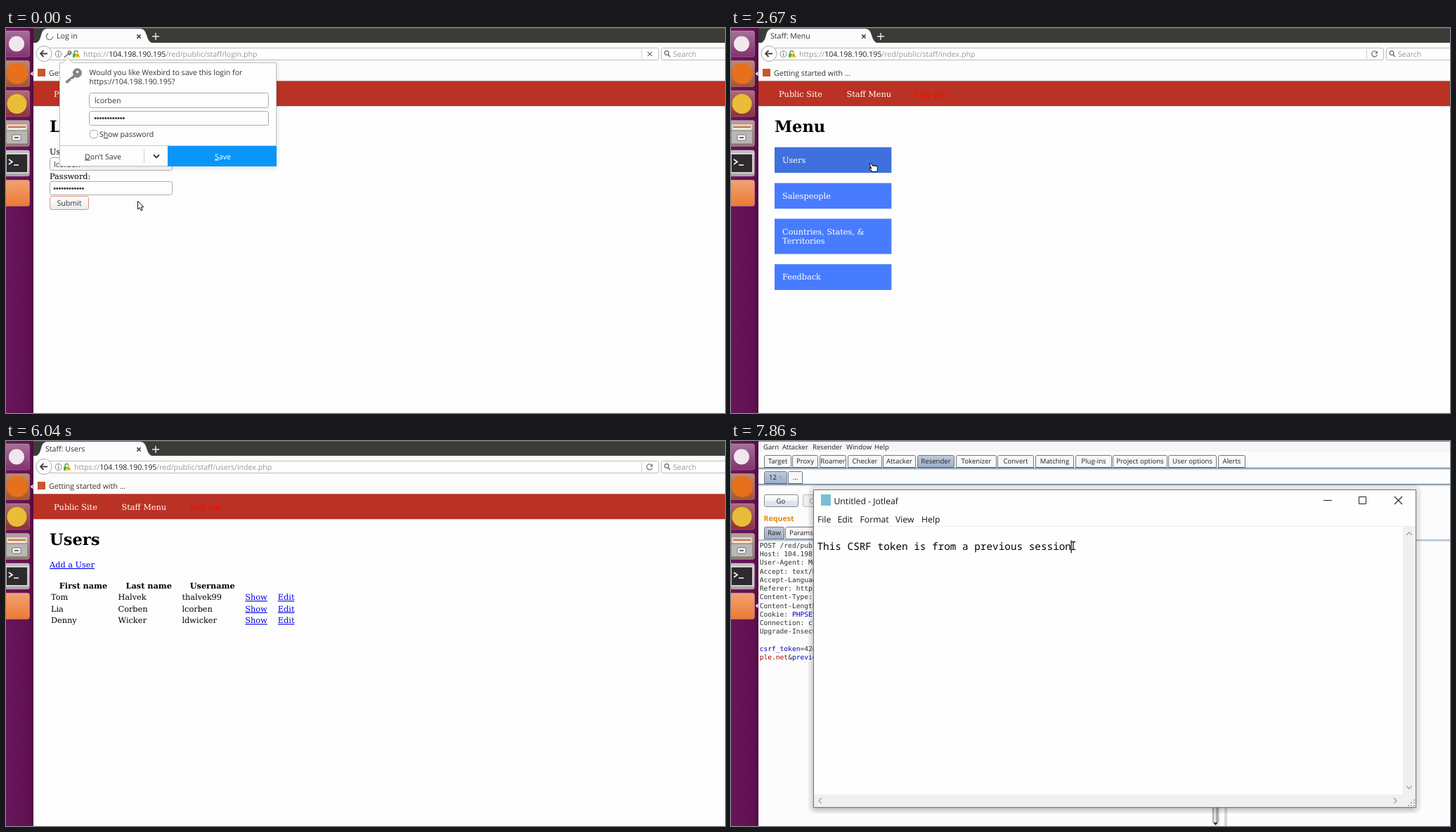
An HTML page that plays this animation: 1023x548 px, repeating every 8000 ms.

```html
<!DOCTYPE html>
<html lang="en">
<head>
<meta charset="utf-8">
<title>Login walkthrough</title>
<style>
html, body { margin: 0; width: 100%; height: 100%; overflow: hidden; background: #fdfdfd; }
svg { display: block; width: 1023px; height: 548px; }
text { text-rendering: geometricPrecision; white-space: pre; fill: #333; }
.ui { font: 10.6px "Open Sans", "Noto Sans", sans-serif; }
.page { font: 11.3px "DejaVu Serif", "Noto Serif", serif; fill: #000; }
.head { font: bold 22.6px "DejaVu Serif", "Noto Serif", serif; fill: #000; }
.tool { font: 9.6px "Open Sans", "Noto Sans", sans-serif; fill: #222; }
.raw { font: 9.6px "DejaVu Sans Mono", monospace; }
.win { font: 12.2px "Open Sans", "Noto Sans", sans-serif; fill: #111; }
.note { font: 14.35px "Noto Sans Mono", "DejaVu Sans Mono", monospace; fill: #000; }
.mid { text-anchor: middle; }
.white { fill: #fff; }
.blue { fill: #0000c8; }
.dim { fill: #999; }
.link { fill: #00e; text-decoration: underline; }
.bold { font-weight: bold; }
</style>
</head>
<body>
<svg id="stage" viewBox="0 0 1023 548"></svg>
<script>
const LOOP = 8000;
const LOADED_MENU = 1130, CLICK_USERS = 3140, LOADED_USERS = 3870, TOOL_OPEN = 6580;

const text = (cls, x, y, str) => `<text class="${cls}" x="${x}" y="${y}">${str}</text>`;
const rect = (x, y, w, h, fill, extra = '') =>
  `<rect x="${x}" y="${y}" width="${w}" height="${h}" fill="${fill}" ${extra}/>`;
const frame = (x, y, w, h, r = 2.5, fill = '#fdfdfd', stroke = '#aaa') =>
  rect(x + .5, y + .5, w - 1, h - 1, fill, `rx="${r}" stroke="${stroke}"`);
const line = (d, stroke = '#555', width = 1, extra = '') =>
  `<path d="${d}" fill="none" stroke="${stroke}" stroke-width="${width}" ${extra}/>`;
const shape = (d, fill, extra = '') => `<path d="${d}" fill="${fill}" ${extra}/>`;
const circle = (x, y, r, fill, extra = '') => `<circle cx="${x}" cy="${y}" r="${r}" fill="${fill}" ${extra}/>`;
const at = (x, y, body) => `<g transform="translate(${x} ${y})">${body}</g>`;
const cross = (x, y, r, color, width = 1.2) =>
  line(`M${x - r} ${y - r}l${2 * r} ${2 * r}m0 ${-2 * r}l${-2 * r} ${2 * r}`, color, width);
const under = (letter) => `<tspan text-decoration="underline">${letter}</tspan>`;

const defs = `<defs>
  <linearGradient id="side"><stop stop-color="#68165b"/><stop offset=".85" stop-color="#611051"/><stop offset="1" stop-color="#4d0a41"/></linearGradient>
  <linearGradient id="gloss" x2="0" y2="1"><stop stop-color="#fff" stop-opacity=".3"/><stop offset="1" stop-color="#fff" stop-opacity="0"/></linearGradient>
  <linearGradient id="button" x2="0" y2="1"><stop stop-color="#fff"/><stop offset="1" stop-color="#ebebeb"/></linearGradient>
  <linearGradient id="tab" x2="0" y2="1"><stop stop-color="#bfcbdb"/><stop offset="1" stop-color="#9dafc5"/></linearGradient>
  <filter id="soft"><feGaussianBlur stdDeviation="3"/></filter></defs>`;

function launcher(activeY) {
  const tiles = ['#82336f', '#a4572f', '#8d2f3b', '#94796f', '#a9a4a5', '#ec7a35'];
  const body = tiles.map((color, i) => {
    const y = 4 + i * 42.5;
    return rect(-3, y, 36.5, 37, color, 'rx="3" stroke="#d5a7c4" stroke-opacity=".35"') +
      rect(-3, y, 36.5, 37, 'url(#gloss)', 'rx="3"');
  }).join('');
  const cabinet = rect(1, 137, 29, 10, '#d9d4cd', 'rx="1"') + rect(3, 140, 25, 5, '#d06a42') +
    rect(3, 142, 25, 4, '#f1e6d4') + rect(0, 146, 31, 19, '#b9b7b3', 'rx="1" stroke="#77716d"') +
    rect(9, 152, 12, 8, '#f5f5f5', 'rx="1" stroke="#777"') + rect(12, 155, 6, 2, '#666');
  const terminal = rect(0, 179, 31, 27, '#2d2b2d', 'stroke="#eee" stroke-width="1.5"') +
    line('M4 187l5 3.5l-5 3.5M11 195h7', '#fff', 1.6);
  return rect(0, 0, 39, 548, 'url(#side)') + body + circle(15, 22.5, 11, '#f2e7ee') +
    circle(16, 65, 15, '#e6701c') + circle(15.5, 108, 14, '#e9bd37') + cabinet + terminal +
    shape(`M38.5 ${activeY - 3.5}l-4 3.5l4 3.5z`, '#e9dce6');
}

function spinner(t, connecting) {
  const turn = Math.floor(t / 143) * (connecting ? -50 : 65);
  const spin = `transform="rotate(${turn} 62 12)"`;
  return connecting
    ? circle(62, 12, 4.6, 'none', `stroke="#777" stroke-width="1.3" stroke-dasharray="19 9.9" ${spin}`)
    : circle(62, 12, 4.8, 'none', 'stroke="#b9dcf5" stroke-width="2.2"') +
      circle(62, 12, 4.8, 'none', `stroke="#2b93df" stroke-width="2.2" stroke-dasharray="17 14" ${spin}`);
}

const keyIcon = (x, y, scale, color) =>
  `<g transform="translate(${x} ${y}) scale(${scale})">` +
  shape('M21 1a7 7 0 0 0-9 10L0 20v3h5v-3h3v-3h3l3-3a7 7 0 0 0 7-13M18 4a2 2 0 1 1 0 4a2 2 0 1 1 0-4', color, 'fill-rule="evenodd"') + '</g>';

function browserChrome(t, state) {
  const { loading, connecting, popup, title, file } = state;
  const lockX = popup ? 95 : 82;
  const lock = line(`M${lockX + 2} 37v-2a2.5 2.5 0 0 1 5 0v2`, '#57a63c', 1.4) +
    rect(lockX, 36.5, 8.5, 5.5, '#55aa35', 'rx="1"') +
    shape(`M${lockX + 7} 34.5l4.5 7.5h-9z`, '#f6c321', 'stroke="#fdfdfd" stroke-width=".5"') +
    rect(lockX + 6.5, 37.5, 1, 2.5, '#755');
  const url = `https://<tspan fill="#222">104.198.190.195</tspan>/red/public/staff/${file}`;
  const action = loading ? cross(916, 37, 3.2, '#666') :
    line('M918.6 34.2a4 4 0 1 0 .8 4', '#777', 1.3) + shape('M920 32.5v4h-4z', '#777');
  return rect(39, 0, 984, 22, '#3c3b37') + rect(39, 0, 984, 1, '#55534e') +
    rect(39, 21, 984, 54, '#fcfcfc') +
    shape('M39 22C47 21 48 17 50 10C52 3 54 1 60 1H190C196 1 198 4 200 10C202 17 204 21 211 22Z', '#fcfcfc') +
    (loading ? spinner(t, connecting) : '') + text('ui', loading ? 72 : 56, 15.3, title) +
    cross(189, 12, 2.6, '#444', 1.5) + line('M208 12h10M213 7v10', '#eee', 1.4) +
    frame(60, 28, 869, 18, 2, '#fefefe', '#bbb') +
    circle(54, 36.5, 11, '#fcfcfc', 'stroke="#aaa"') +
    line('M59 36.5H49.5M53.5 32l-4.5 4.5l4.5 4.5', '#444', 1.8) +
    circle(74.5, 37, 4.5, 'none', 'stroke="#888"') + line('M74.5 36v3.8M74.5 33.8v1.3', '#777', 1.2) +
    (popup ? keyIcon(82.5, 32, .44, '#808080') : '') + lock +
    text('ui dim', popup ? 110 : 97, 41, url) +
    line('M904.5 30v14', '#ccc') + action + frame(932, 28, 95, 18, 2, '#fefefe', '#bbb') +
    circle(940, 35.5, 2.9, 'none', 'stroke="#666" stroke-width="1.2"') + line('M942 38l3 3', '#666', 1.4) +
    text('ui dim', 949, 41, 'Search') +
    rect(45, 58, 11, 11, '#c8562f') + text('ui', 61, 67.5, 'Getting started with …') +
    rect(39, 75, 984, 36, '#ba3224') + line('M39 75.5H1023M39 111.5H1023', '#bbb', 1, 'opacity=".55"') +
    text('page white', 68, 98, 'Public Site');
}

const dots = (x, y) => Array.from({ length: 12 }, (_, i) => circle(x + 1.6 + i * 3.66, y, 1.45, '#333')).join('');

const loginPage = () => text('head', 62, 148, 'Log in') +
  text('page', 62, 180, 'Username:') + frame(62, 184, 175, 19, 3) + text('ui', 68, 197.5, 'lcorben') +
  text('page', 62, 214.5, 'Password:') + frame(62, 218, 175, 20, 3) + dots(67.5, 228.5) +
  frame(62, 239, 56, 20, 3, 'url(#button)', '#e58f70') + text('ui mid', 90, 252.7, 'Submit');

const savePrompt = () => rect(77, 50, 309, 149, '#000', 'opacity=".12" filter="url(#soft)"') +
  frame(76, 49, 309, 148, 0, '#fdfdfd', '#c4c4c4') +
  shape('M81 50l7-7l7 7z', '#fdfdfd') + line('M81 49.5l7-7l7 7', '#c4c4c4') +
  keyIcon(85, 57, .92, '#858585') +
  text('ui', 118.5, 67.2, 'Would you like Wexbird to save this login for') +
  text('ui', 118.5, 79.5, 'https://104.198.190.195?') +
  frame(118, 92, 256, 22, 3) + text('ui', 126, 106.5, 'lcorben') +
  frame(118, 118, 256, 21, 3) + dots(125.5, 128.5) +
  frame(119, 145, 12, 12, 3) + text('ui', 133, 155, `S${under('h')}ow password`) +
  line('M77 167.5H385', '#ccc') + line('M196.5 172v20', '#ccc') + line('M210 180.5l4 4l4-4', '#333', 1.8) +
  text('ui mid', 138, 186.5, `${under('D')}on’t Save`) +
  rect(230, 168, 155, 29, '#0996f8') + text('ui mid white', 308.5, 186.5, `${under('S')}ave`);

const staffNav = () => text('page white', 164.5, 98, 'Staff Menu') +
  `<text class="page" x="262" y="98" style="fill:#f00">Log out</text>`;

function menuPage(hover) {
  const item = (y, h, rows, fill = '#487cff') => rect(62, y, 166.3, h, fill) +
    rows.map((row, i) => text('page white', 73, y + 22 + i * 13.8, row)).join('');
  return text('head', 62, 148, 'Menu') +
    item(169.7, 36.5, ['Users'], hover ? '#3f70de' : undefined) + item(220.7, 36.5, ['Salespeople']) +
    item(271.5, 50.2, ['Countries, States, &amp;', 'Territories']) + item(336.2, 36.7, ['Feedback']);
}

function usersPage() {
  const rows = [['Tom', 'Halvek', 'thalvek99'], ['Lia', 'Corben', 'lcorben'], ['Denny', 'Wicker', 'ldwicker']];
  const columns = [64, 159.5, 250.5];
  return text('head', 62, 148, 'Users') + text('page link', 62, 180, 'Add a User') +
    text('page bold mid', 110, 209.7, 'First name') + text('page bold mid', 203.3, 209.7, 'Last name') +
    text('page bold mid', 293.7, 209.7, 'Username') +
    rows.map((row, i) => {
      const y = 226.3 + i * 16.5;
      return row.map((cell, c) => text('page', columns[c], y, cell)).join('') +
        text('page link', 340.3, y, 'Show') + text('page link', 386.8, y, 'Edit');
    }).join('');
}

function toolTab(x, y, right, label, on) {
  const w = right - x;
  return shape(`M${x + .5} ${y + 17.5}v-15q0-2 2-2h${w - 5}q2 0 2 2v15z`, on ? 'url(#tab)' : '#f7f7f7', 'stroke="#6f7780"') +
    text('tool mid', x + w / 2, y + 12.2, label);
}

function proxyTool() {
  const menus = [[46, 'Garn'], [73, 'Attacker'], [116, 'Resender'], [164, 'Window'], [204, 'Help']];
  const tabs = [[47, 86, 'Target'], [87, 124, 'Proxy'], [126, 164, 'Roamer'], [166, 215, 'Checker'],
    [216, 263, 'Attacker'], [265, 318, 'Resender'], [320, 378, 'Tokenizer'], [379, 431, 'Convert'],
    [433, 488, 'Matching'], [490, 542, 'Plug-ins'], [543, 621, 'Project options'],
    [622, 691, 'User options'], [693, 732, 'Alerts']];
  const blue = (s) => `<tspan class="blue">${s}</tspan>`;
  const request = ['POST /red/public/staff/', 'Host: 104.198.190.195', 'User-Agent: Mozilla/5.0', 'Accept: text/html,*/*',
    'Accept-Language: en-US', 'Referer: https://104.198', 'Content-Type: application', 'Content-Length: 174',
    `Cookie: ${blue('PHPSESSID')}=`, 'Connection: close', 'Upgrade-Insecure-Requests', '',
    `${blue('csrf_token')}=42da65a`, `<tspan fill="#b00000">ple.net</tspan>&amp;${blue('previous_p')}`];
  const rule = (y) => rect(39, y, 984, 1, '#55718a') + rect(39, y + 1, 984, 2, '#c3d1df');
  return rect(39, 0, 984, 548, '#fcfcfc') + rect(39, 0, 984, 15, '#f5f5f5') + line('M39 .5H1023', '#888') +
    menus.map(([x, label]) => text('tool', x, 11.5, label)).join('') +
    tabs.map(([x, right, label]) => toolTab(x, 20, right, label, label === 'Resender')).join('') + rule(38) +
    toolTab(47, 43, 80, '12 <tspan fill="#8493a5">×</tspan>', true) + toolTab(81, 43, 102, '...') + rule(61) +
    frame(47, 76, 49, 18, 2, 'url(#button)', '#888') + rect(48, 85, 47, 8, '#d7e0eb', 'opacity=".7"') + text('tool mid', 71, 88.5, 'Go') +
    frame(102, 76, 49, 18, 2, '#eee', '#bbb') + text('tool mid dim', 126, 88.5, 'Cancel') +
    `<text class="ui bold" x="46.5" y="113.7" style="fill:#e58a10">Request</text>` +
    toolTab(47, 122, 76, 'Raw', true) + toolTab(77, 122, 123, 'Params') + toolTab(124, 122, 171, 'Headers') +
    rect(39, 140, 984, 2.5, '#b6c5d6') +
    request.map((row, i) => text('raw', 40.7, 152 + i * 12.22, row)).join('') +
    rect(684, 142, 12, 406, '#eee') + rect(685, 142, 9, 401, '#a9adb2') + rect(687, 142, 3, 401, '#e2e5e8') +
    shape('M686 543h7l-3.5 4z', '#333') + rect(702, 142, 4, 406, '#d8d8d8');
}

function editor(x, y) {
  const menus = [[6, 'File'], [34.5, 'Edit'], [66.5, 'Format'], [117, 'View'], [154, 'Help']];
  const grip = [[8, 0], [4, 4], [8, 4], [0, 8], [4, 8], [8, 8]]
    .map(([dx, dy]) => rect(846 + dx, 441 + dy, 2, 2, '#b0b0b0')).join('');
  const arrows = line('M844 65l4-4l4 4M844 422l4 4l4-4M12 439l-4 4l4 4M826 439l4 4l-4 4', '#aaa', 1.5);
  return at(x, y,
    rect(-7, -7, 872, 468, '#000', 'rx="10" opacity=".055"') +
    rect(0, 2, 857, 453, '#000', 'rx="2" opacity=".3" filter="url(#soft)"') +
    frame(0, 0, 858, 453, 0, '#fefefe', '#777') +
    rect(11, 7, 14, 16, '#79bfd6') + text('win', 29.5, 20.5, 'Untitled - Jotleaf') +
    line('M726 15.5h12M776.5 10.5h10v10h-10z', '#222') + cross(832.5, 15.5, 5.5, '#222', 1.1) +
    menus.map(([mx, label]) => text('win', mx, 47, label)).join('') + line('M1 52.5H857', '#eee') +
    rect(839, 53, 18, 399, '#f0f0f0') + rect(1, 434, 856, 18, '#f0f0f0') + arrows + grip +
    text('note', 5.5, 86, 'This CSRF token is from a previous session') + rect(366.5, 72.5, 1.2, 18, '#000'));
}

const cursors = {
  none: '',
  arrow: shape('M.5 .5V12L3.2 9.6L5.2 14L7.2 13.1L5.3 8.8H8.8Z', '#fff', 'stroke="#111"'),
  beam: line('M-3 -5.5h2.2l.8.7l.8-.7H3M-3 5.5h2.2l.8-.7l.8.7H3M0 -5v10', '#222', 1.3),
  hand: shape('M-5 -5.5q1.5-1.4 2.7 0l2 2.6h5.6l1 1.8v5.4l-1.4 1.2h-6l-4-4.2q.2-2 2-.8l.8.4z', '#fff', 'stroke="#111" stroke-width="1.1"')
};

// [start ms, cursor, x, y]; each entry holds until the next
const pointer = [
  [0, 'arrow', 187, 246], [290, 'arrow', 210, 243], [430, 'beam', 275, 238], [570, 'beam', 325, 233],
  [710, 'beam', 351, 231], [1130, 'arrow', 345, 229],
  [2060, 'arrow', 318, 224], [2210, 'arrow', 268, 214], [2360, 'hand', 222, 202], [2520, 'hand', 209, 199],
  [2670, 'hand', 202, 199], [3870, 'arrow', 201, 193], [5370, 'arrow', 201, 197],
  [5650, 'arrow', 416, 178], [5780, 'arrow', 578, 430], [5910, 'arrow', 913, 513], [6040, 'none', 0, 0],
  [6580, 'arrow', 468, 79], [7150, 'arrow', 454, 81], [7290, 'arrow', 440, 83],
  [7440, 'beam', 455, 126], [7580, 'beam', 470, 148], [7710, 'beam', 478, 145], [7860, 'beam', 487, 149]
];
// [start ms, x, y] of the dragged editor window
const drag = [[0, 145, 65], [7150, 131, 67], [7290, 117, 69]];
const current = (list, t) => list.filter(([start]) => start <= t).pop();

function scene(t) {
  const [, kind, px, py] = current(pointer, t);
  const cursor = at(px, py, cursors[kind]);
  if (t >= TOOL_OPEN) {
    const [, x, y] = current(drag, t);
    return defs + proxyTool() + editor(x, y) + launcher(234.5) + cursor;
  }
  const usersOpening = t >= 3720, redirected = t >= 850;
  const state = {
    loading: t < LOADED_MENU || (t >= CLICK_USERS && t < LOADED_USERS),
    connecting: !redirected || (t >= CLICK_USERS && !usersOpening),
    popup: t < 430,
    title: usersOpening ? 'Staff: Users' : redirected ? 'Staff: Menu' : 'Log in',
    file: usersOpening ? 'users/index.php' : t >= 430 ? 'index.php' : 'login.php'
  };
  const page = t < LOADED_MENU ? loginPage()
    : staffNav() + (t < LOADED_USERS ? menuPage(t >= 2360) : usersPage());
  return defs + browserChrome(t, state) + page + (state.popup ? savePrompt() : '') + launcher(65) + cursor;
}

const stage = document.getElementById('stage');
let shown = '';
function tick() {
  const next = scene(performance.now() % LOOP);
  if (next !== shown) stage.innerHTML = shown = next;
  requestAnimationFrame(tick);
}
tick();
</script>
</body>
</html>
```
